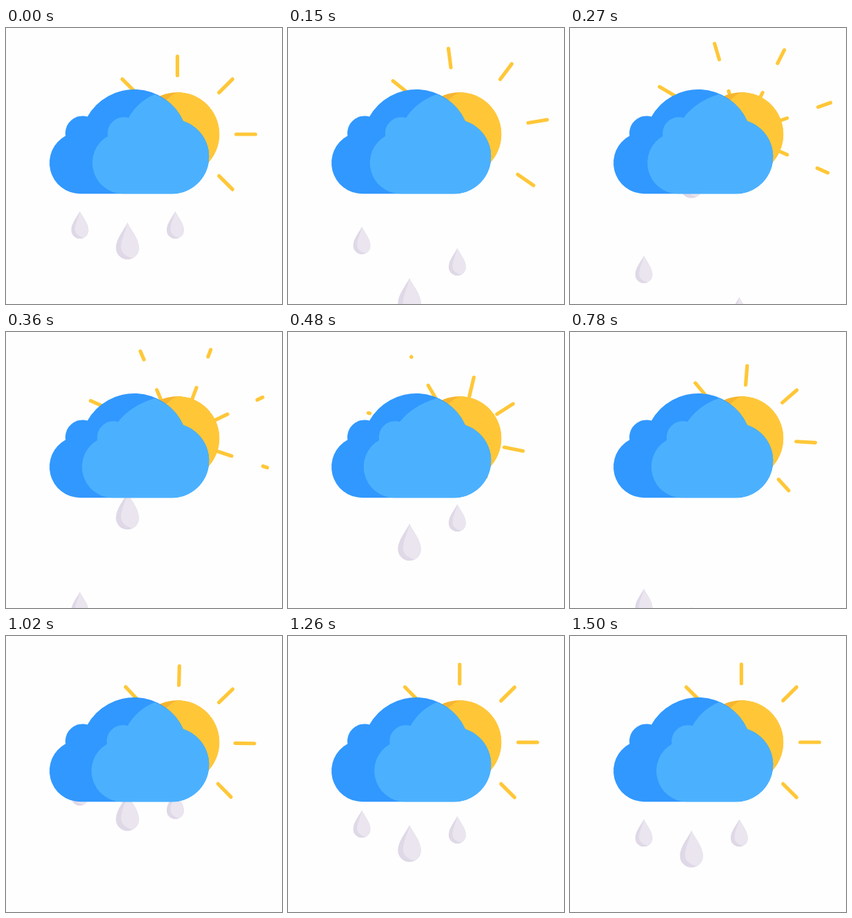
Animation of 400x400 px, one loop 2.53 s. Source, as an HTML page:

```html
<!DOCTYPE html>
<html lang="en">
<head>
<meta charset="utf-8">
<title>Sun, cloud and rain</title>
<style>
  html, body { margin: 0; width: 100%; height: 100%; overflow: hidden; background: #fefefe; }
  svg { display: block; width: 100vw; height: 100vh; }
</style>
</head>
<body>
<svg viewBox="0 0 400 400" xmlns="http://www.w3.org/2000/svg">
  <defs>
    <g id="drop">
      <path fill="#dfd8e6" d="M0 0C4.5 10 16.7 23 16.7 36.8A16.7 16.7 0 0 1 -16.7 36.8C-16.7 23 -4.5 10 0 0Z"/>
      <path fill="#eae5ef" d="M0 0C4.5 10 16.7 23 16.7 36.8A16.7 16.7 0 0 1 7.6 51.7C-1.5 49.5 -9.3 44 -9.3 35.5C-9.3 24 -1.5 11 0 0Z"/>
    </g>
  </defs>
  <path id="rays" fill="none" stroke="#ffc738" stroke-width="5.2" stroke-linecap="round"/>
  <circle cx="248.4" cy="154" r="60.8" fill="#f6b52e"/>
  <path fill="#ffc738" d="M248.4 93.2A60.8 60.8 0 0 1 248.4 214.8C200 195 205 112 248.4 93.2Z"/>
  <g id="rain"></g>
  <path fill="#3198ff" d="M107.5 240.3A44.8 44.8 0 0 1 86.3 156.2A25 25 0 0 1 118 128.5A78 78 0 0 1 257 135A54 54 0 0 1 238 240.3Z"/>
  <path id="front" fill="#4bb1ff"/>
</svg>
<script>
const LOOP = 2530, STEP = 30, END = 1500;
const TIMES = [0, 270, 480, 780, 1020, 1260, 1500];
const SUN = { x: 248.4, y: 154 };
const RAY = { from: 85.3, to: 113, limit: 137, pitch: 75.5 };
const WRAP = 260;

const remaining = [1, 0.796, 0.566, 0.34, 0.205, 0.09, 0];
const sway = [0, 13, 15.5, 7.3, 1.3, 0, 0];
const drops = [
  { x: 107, y: 265.5, size: 0.745, fall: [0, 64.5, 185, 366.5, 460.5, 507, 520] },
  { x: 176, y: 282, size: 1, fall: [0, 171, 256, 376.5, 467, 512, 520] },
  { x: 245.3, y: 265.5, size: 0.745, fall: [0, 124.5, 244, 396, 480, 515.5, 520] }
];

const el = id => document.getElementById(id);
const clamp = (v, lo, hi) => Math.min(hi, Math.max(lo, v));

// Smooth curve through values at TIMES, at rest at both ends.
function curve(values, t) {
  const last = TIMES.length - 1;
  const slope = i => i === 0 || i === last ? 0 :
    ((values[i] - values[i - 1]) / (TIMES[i] - TIMES[i - 1]) +
     (values[i + 1] - values[i]) / (TIMES[i + 1] - TIMES[i])) / 2;
  let i = 0;
  while (i < last - 1 && t > TIMES[i + 1]) i++;
  const w = TIMES[i + 1] - TIMES[i], u = (t - TIMES[i]) / w;
  const a = u * u * (3 - 2 * u);
  return values[i] * (1 - a) + values[i + 1] * a +
    w * u * (1 - u) * (slope(i) * (1 - u) - slope(i + 1) * u);
}

function spoke(angle, r1, r2) {
  const a = angle * Math.PI / 180, dx = Math.sin(a), dy = -Math.cos(a);
  const at = r => (SUN.x + dx * r).toFixed(2) + " " + (SUN.y + dy * r).toFixed(2);
  return "M" + at(r1) + "L" + at(r2);
}

// Each ray turns back one slot while it slides out and a new one follows.
function rayPath(t) {
  const s = curve(remaining, t), spread = 0.0215 * Math.min(1, t / 250);
  let d = "";
  for (let k = -1; k <= 4; k++) {
    const q = clamp(s - spread * k, 0, 1), p = 1 - q * q;
    const angle = 45 * (k - p), shift = RAY.pitch * p;
    if (k < 4 && RAY.from + shift <= RAY.limit) {
      d += spoke(angle, RAY.from + shift, Math.min(RAY.limit, RAY.to + shift));
    }
    const start = RAY.from - RAY.pitch + shift;
    const grow = k < 4 ? 1 : 1 - Math.min(1, q / 0.47) ** 2.5;
    const stop = start + (RAY.to - RAY.from) * grow;
    if (stop > 0) d += spoke(angle, Math.max(0, start), stop);
  }
  return d;
}

function frontPath(t) {
  const s = curve(sway, t);
  return `M238 240.3H${169 - s}A44.8 44.8 0 0 1 ${147.6 - s} 156.7` +
    `A23.5 23.5 0 0 1 ${177.5 - s} 130.2Q${190.6 - 0.66 * s} 106.6 215.8 95.9` +
    "A78 78 0 0 1 257 135A54 54 0 0 1 238 240.3Z";
}

for (const drop of drops) {
  drop.node = document.createElementNS("http://www.w3.org/2000/svg", "use");
  drop.node.setAttribute("href", "#drop");
  el("rain").append(drop.node);
}

function draw(t) {
  el("rays").setAttribute("d", rayPath(t));
  el("front").setAttribute("d", frontPath(t));
  for (const { x, y, size, fall, node } of drops) {
    let top = y + curve(fall, t);
    // Below the stage, start again behind the cloud.
    while (top >= 400) {
      const next = top - WRAP;
      if (next + 53.5 * size > 240 && t < END && top < 400 + 53.5 * size && next < 140) break;
      top = next;
    }
    node.setAttribute("transform", `translate(${x} ${top.toFixed(2)}) scale(${size})`);
  }
}

const begin = performance.now();
function tick() {
  const t = (performance.now() - begin) % LOOP;
  draw(Math.min(END, Math.floor(t / STEP) * STEP));
  requestAnimationFrame(tick);
}
draw(0);
requestAnimationFrame(tick);
</script>
</body>
</html>
```
